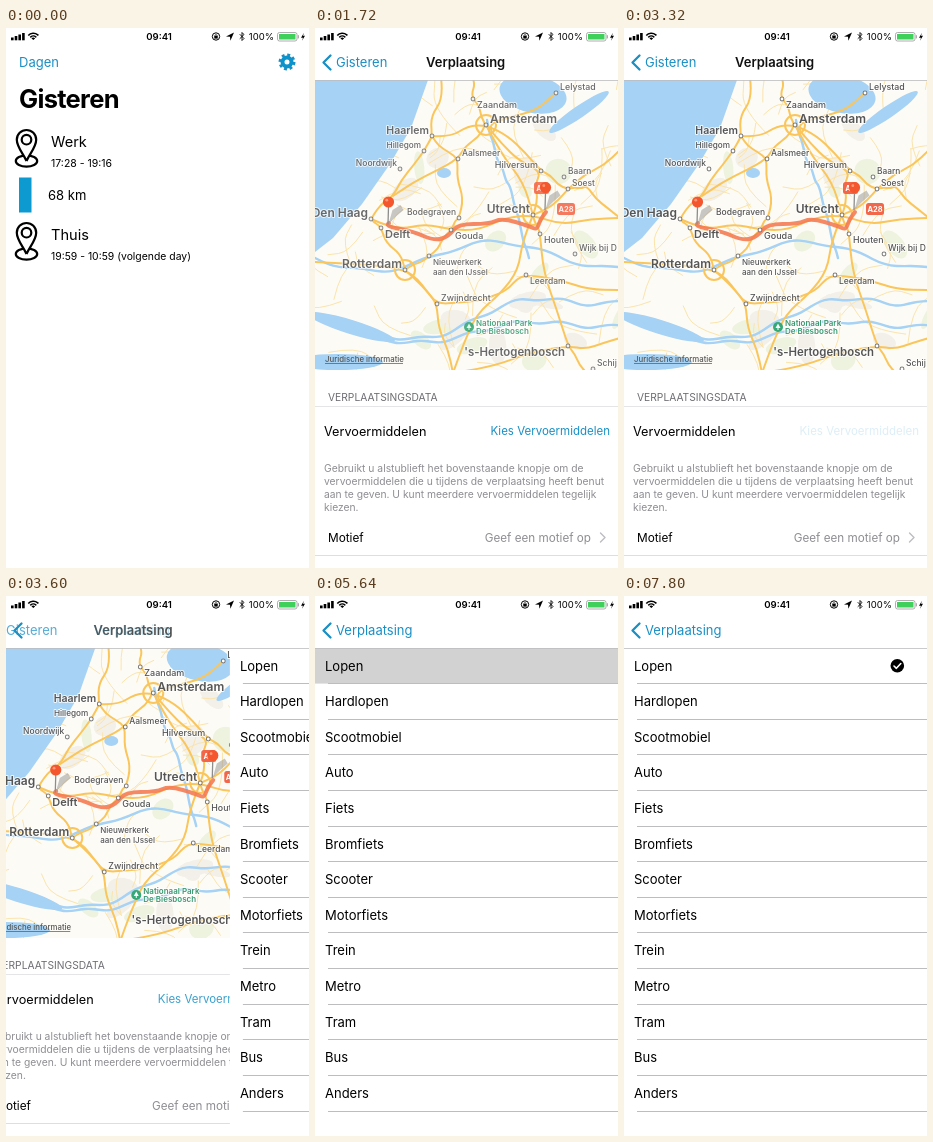
These frames come from a looping animation (303x540 px, 8000 ms). An HTML page with a canvas:

```html
<!DOCTYPE html>
<html lang="nl">
<head>
<meta charset="utf-8">
<title>Verplaatsing</title>
<style>
  html, body { margin: 0; width: 100%; height: 100%; overflow: hidden; background: #fff; }
  canvas { display: block; width: 303px; height: 540px; }
</style>
</head>
<body>
<canvas></canvas>
<script>
const W = 303, H = 540, LOOP = 8000;
const BLUE = '#1a8fc4', LINE = '#bdbdc0', GREY = '#8e8e93', FONT = 'Inter, sans-serif';
const canvas = document.querySelector('canvas');
const dpr = window.devicePixelRatio || 1;
canvas.width = W * dpr;
canvas.height = H * dpr;
const c = canvas.getContext('2d');
c.scale(dpr, dpr);

const clamp = v => Math.max(0, Math.min(1, v));
const lerp = (a, b, k) => a + (b - a) * k;
const ramp = (t, from, to) => clamp((t - from) / (to - from));
const ease = k => k * k * (3 - 2 * k);

function group(fn, x = 0, y = 0, alpha = 1) {
  if (alpha <= 0) return;
  c.save();
  c.translate(x, y);
  c.globalAlpha *= alpha;
  fn();
  c.restore();
}

function rect(x, y, w, h, color) {
  c.fillStyle = color;
  c.fillRect(x, y, w, h);
}

// y is the middle of the capitals
function text(str, x, y, size, color = '#000', { weight = 400, align = 'left', alpha = 1, spacing = 0, halo } = {}) {
  group(() => {
    c.font = `${weight} ${size}px ${FONT}`;
    c.textAlign = align;
    c.letterSpacing = spacing + 'px';
    if (halo) {
      c.lineJoin = 'round';
      c.lineWidth = 2;
      c.strokeStyle = halo;
      c.strokeText(str, x, y + size * 0.36);
    }
    c.fillStyle = color;
    c.fillText(str, x, y + size * 0.36);
  }, 0, 0, alpha);
}

function trace(pts, smooth) {
  const n = pts.length;
  c.beginPath();
  c.moveTo(pts[0], pts[1]);
  for (let i = 2; i < n; i += 2) {
    if (smooth && i < n - 2)
      c.quadraticCurveTo(pts[i], pts[i + 1], (pts[i] + pts[i + 2]) / 2, (pts[i + 1] + pts[i + 3]) / 2);
    else c.lineTo(pts[i], pts[i + 1]);
  }
}

function stroke(pts, color, width, smooth = false) {
  trace(pts, smooth);
  c.strokeStyle = color;
  c.lineWidth = width;
  c.lineCap = c.lineJoin = 'round';
  c.stroke();
}

function fill(pts, color) {
  trace(pts);
  c.fillStyle = color;
  c.fill();
}

function oval(x, y, rx, ry, color, angle = 0) {
  c.beginPath();
  c.ellipse(x, y, rx, ry, angle, 0, 7);
  c.fillStyle = color;
  c.fill();
}
const disc = (x, y, r, color) => oval(x, y, r, r, color);

function ring(x, y, r, color, width, from = 0, to = 2 * Math.PI) {
  c.beginPath();
  c.arc(x, y, r, from, to);
  c.strokeStyle = color;
  c.lineWidth = width;
  c.lineCap = 'butt';
  c.stroke();
}

// arrow head with its tip at x, y; dir -1 points left
function chevron(x, y, size, dir, color, width) {
  stroke([x - dir * size, y - size, x, y, x - dir * size, y + size], color, width);
}

function statusBar() {
  for (let i = 0; i < 4; i++) rect(5 + i * 3.7, 9.5 - i * 1.5, 2.6, 2.8 + i * 1.5, '#000');
  for (const r of [1.2, 4, 6.7]) ring(27.3, 12, r, '#000', r < 2 ? 2.4 : 1.6, -Math.PI * 0.77, -Math.PI * 0.23);
  text('09:41', 153, 8.5, 9.6, '#000', { weight: 600, align: 'center' });
  ring(210, 8.5, 3.7, '#000', 1);
  rect(208.3, 8, 3.4, 2.6, '#000');
  ring(210, 7.8, 1.1, '#000', 0.8);
  fill([228, 4.5, 220, 8.5, 224, 8.8, 224.4, 12.8], '#000');
  group(() => stroke([-2, -2, 2, 2, 0, 4, 0, -4, 2, -2, -2, 2], '#000', 0.9), 236, 8.5);
  text('100%', 268, 8.5, 9.5, '#000', { align: 'right' });
  c.beginPath();
  c.roundRect(271.5, 4.5, 19.5, 8.5, 2);
  c.strokeStyle = '#9a9a9a';
  c.lineWidth = 0.8;
  c.stroke();
  rect(273, 6, 16.5, 5.5, '#3fd05c');
  rect(291.8, 7.2, 1, 3.2, '#9a9a9a');
  group(() => fill([1, -4, -2, 1, 0, 1, -1, 4, 2, -1, 0, -1], '#000'), 297, 8.7);
}

function gear() {
  c.setLineDash([2.85, 2.65]);
  ring(281, 34, 7, BLUE, 3);
  c.setLineDash([]);
  ring(281, 34, 4.5, '#0d93cb', 4);
}

function placeIcon(y) {
  group(() => {
    c.beginPath();
    c.ellipse(0, 32, 10.7, 5.6, 0, 0, 7);
    c.strokeStyle = '#000';
    c.lineWidth = 2.2;
    c.stroke();
    c.beginPath();
    c.moveTo(0, 32);
    c.bezierCurveTo(-3, 25, -9.7, 18, -9.7, 10.7);
    c.arc(0, 10.7, 9.7, Math.PI, 0);
    c.bezierCurveTo(9.7, 18, 3, 25, 0, 32);
    c.fillStyle = '#fff';
    c.fill();
    c.stroke();
    ring(0, 10.7, 4.8, '#000', 2.2);
  }, 20.5, y);
}

function dayPage(pressed) {
  if (pressed) rect(0, 149, W, 36.5, '#cacaca');
  placeIcon(101);
  text('Werk', 45, 114, 14.6);
  text('17:28 - 19:16', 45, 135, 10.5);
  rect(13, 149.5, 12.5, 35, '#0d9ad1');
  text('68 km', 42, 167, 13);
  placeIcon(194);
  text('Thuis', 45, 207, 14.6);
  text('19:59 - 10:59 (volgende day)', 45, 228, 10.4);
}

function emptyMap() {
  rect(0, 52, W, 290, '#fdfcf9');
  for (let i = 0; i < 36; i++) {
    const major = i % 4 === 0, strong = i % 8 === 0;
    const color = strong ? '#c4c4c2' : major ? '#d6d6d2' : '#f3efe2';
    const width = strong ? 1.8 : major ? 1.3 : 0.7;
    const x = -5 + i * 8.9, y = 60 + i * 8.9;
    stroke([x, 52, x, 342], color, width);
    if (y < 342) stroke([0, y, W, y], color, width);
  }
}

// name: dot x, dot y, font size, label side (l or r) and height (u or d)
const PLACES = {
  'Zaandam': [158, 71, 9, 'rd'],
  'Haarlem': [117, 108, 10.5, 'lu'],
  'Amsterdam': [171, 97, 12, 'ru'],
  'Lelystad': [241, 65, 8.8, 'ru'],
  'Hillegom': [109, 123, 8.2, 'lu'],
  'Noordwijk': [85, 141, 8.5, 'lu'],
  'Aalsmeer': [143, 131, 8.5, 'ru'],
  'Hilversum': [226, 143, 9, 'lu'],
  'Baarn': [249, 149, 8.4, 'ru'],
  'Soest': [253, 161, 8.4, 'ru'],
  'Utrecht': [218, 187, 12, 'lu'],
  'Den Haag': [56, 191, 12, 'lu'],
  'Bodegraven': [144, 190, 8.5, 'lu'],
  'Delft': [66, 200, 11, 'rd'],
  'Gouda': [136, 202, 9, 'rd'],
  'Houten': [225, 206, 8.8, 'rd'],
  'Rotterdam': [90, 242, 12, 'lu'],
  'Nieuwerkerk': [114, 228, 8, 'rd'],
  'Leerdam': [211, 247, 8.5, 'rd'],
  'Zwijndrecht': [122, 276, 8.8, 'ru'],
  "'s-Hertogenbosch": [253, 318, 11.4, 'ld'],
  'Wijk bij D': [260, 226, 8.5, 'ru'],
  'Schij': [278, 341, 8.5, 'ru']
};
const JUNCTIONS = {
  leiden: [78, 168], breda: [138, 345], gorinchem: [186, 265], north: [126, 50],
  amersfoort: [272, 158], east: [305, 190], northeast: [305, 122], south: [272, 345],
  west: [-2, 234], northwest: [158, 50], southeast: [305, 310], betuwe: [305, 262]
};
const ROADS = [
  'north Haarlem Hillegom leiden Den_Haag Delft Rotterdam',
  'northwest Zaandam Amsterdam Aalsmeer leiden',
  "Amsterdam Utrecht Houten 's-Hertogenbosch south",
  'Den_Haag Gouda Utrecht east',
  'Rotterdam Nieuwerkerk Gouda Bodegraven Aalsmeer Haarlem',
  'Haarlem Amsterdam Hilversum Soest amersfoort east',
  'west Rotterdam Zwijndrecht gorinchem Leerdam betuwe',
  'Utrecht gorinchem breda',
  'Rotterdam Zwijndrecht breda',
  'Utrecht Hilversum Amsterdam Lelystad',
  'Utrecht Soest northeast',
  "breda 's-Hertogenbosch southeast"
].map(road => road.split(' ').map(key => PLACES[key.replace('_', ' ')] || JUNCTIONS[key]));

const SEA = [0, 52, 113, 52, 96, 100, 75, 136, 47, 176, 18, 210, 0, 224];
const LAKES = [[218, 66, 34, 19, 0.2], [264, 84, 36, 6, -0.6], [129, 145, 7, 5, 0], [36, 299, 46, 7, 0.3], [22, 334, 46, 8, 0]];
const RIVERS = [[0, 230, 303, 226, 14], [70, 308, 303, 264, 10], [70, 312, 303, 292, 6], [172, 92, 214, 226, 5]];
const ROUTE = [74, 195, 69, 198, 97, 203, 120, 213, 134, 208, 143, 196, 174, 196, 187, 190, 214, 198, 222, 202, 225, 192, 231, 184];

function seeded(seed) {
  return () => (seed = (seed * 16807) % 2147483647) / 2147483647;
}

// line through the stops, bent a little between each two
function roadPath(stops, random) {
  const pts = [stops[0][0], stops[0][1]];
  for (let i = 1; i < stops.length; i++) {
    const [ax, ay] = stops[i - 1], [bx, by] = stops[i];
    for (const k of [0.33, 0.67]) {
      const bend = (random() - 0.5) * 0.22;
      pts.push(lerp(ax, bx, k) - (by - ay) * bend, lerp(ay, by, k) + (bx - ax) * bend);
    }
    pts.push(bx, by);
  }
  return pts;
}

function river([x0, y0, x1, y1, swing]) {
  const pts = [];
  for (let k = 0; k <= 1.001; k += 0.04)
    pts.push(lerp(x0, x1, k), lerp(y0, y1, k) + swing * Math.sin(k * 8) + 2 * Math.sin(k * 31));
  return pts;
}

function fullMap() {
  const random = seeded(71);
  rect(0, 52, W, 290, '#fdfbf5');
  for (let i = 0; i < 22; i++)
    oval(90 + random() * 220, 70 + random() * 270, 6 + random() * 14, 4 + random() * 9, i % 2 ? '#eef3df' : '#f3f0ea', random() * 3);
  for (let i = 0; i < 90; i++) {
    const x = random() * W, y = 52 + random() * 290, a = random() * 6.3, len = 14 + random() * 26;
    stroke([x, y, x + len * Math.cos(a), y + len * Math.sin(a),
      x + 1.7 * len * Math.cos(a + 0.4), y + 1.7 * len * Math.sin(a + 0.4)], '#fbe4ac', 1, true);
  }
  const water = '#a5d2f5', road = '#fac65c';
  fill(SEA, water);
  for (const [x, y, rx, ry, angle] of LAKES) oval(x, y, rx, ry, water, angle);
  for (const r of RIVERS) stroke(river(r), water, 2.4, true);
  for (const stops of ROADS) stroke(roadPath(stops, random), road, 2, true);
  for (const city of ['Amsterdam', 'Rotterdam', 'Utrecht']) ring(PLACES[city][0], PLACES[city][1], 10, road, 2);
}

function mapLabels() {
  for (const [name, [x, y, size, side]] of Object.entries(PLACES)) {
    const left = side[0] === 'l', dy = side[1] === 'u' ? -6 : 6;
    disc(x, y, 2.4, '#777');
    disc(x, y, 1.4, '#fff');
    text(name, x + (left ? -3 : 4), y + dy, size, '#555',
      { weight: size > 10 ? 600 : 500, align: left ? 'right' : 'left', halo: '#fffc' });
  }
  text('aan den IJssel', 118, 244, 8, '#555', { weight: 500, halo: '#fffc' });
  disc(154, 299, 5, '#35a877');
  fill([154, 295.5, 151.5, 300, 156.5, 300], '#fff');
  rect(153.5, 300, 1, 2, '#fff');
  ['Nationaal Park', 'De Biesbosch'].forEach((s, i) =>
    text(s, 161, 295 + i * 8, 8, '#3a9a72', { weight: 600, halo: '#fffc' }));
}

function roadSign(label, x, y, w) {
  c.beginPath();
  c.roundRect(x, y, w, 12, 2.5);
  c.fillStyle = '#f2674a';
  c.fill();
  text(label, x + w / 2, y + 6, 7.5, '#fff', { weight: 700, align: 'center' });
}

function mapPin(x, y) {
  group(() => {
    fill([0, 22, 4, 8, 12, 3, 15, 8, 8, 14], '#9998');
    stroke([0, 5, -0.5, 22], '#8d8d8d', 1.3);
    disc(0, 0, 5.6, '#f4562d');
    disc(-1.7, -1.8, 1.4, '#ff9a78');
  }, x, y);
}

function mapView(loaded, labels) {
  c.save();
  c.beginPath();
  c.rect(0, 52, W, 290);
  c.clip();
  emptyMap();
  group(fullMap, 0, 0, loaded);
  stroke(ROUTE, loaded > 0.5 ? '#f5794fdd' : '#fa8a7add', 4, true);
  group(() => {
    mapLabels();
    roadSign('A2', 219, 154, 15);
    roadSign('A28', 242, 175, 18);
  }, 0, 0, labels);
  mapPin(73.5, 174);
  mapPin(230.5, 159.5);
  text('Juridische informatie', 10, 331, 7.8, '#555', { weight: 500 });
  rect(10, 335, 78, 0.7, '#555');
  c.restore();
}

function tripPage(t) {
  mapView(ramp(t, 1460, 1660), ramp(t, 1580, 1740));
  text('VERPLAATSINGSDATA', 13, 369, 10.25, '#6d6d72');
  rect(0, 378, W, 0.7, '#dadade');
  text('Vervoermiddelen', 9, 403, 12.7);
  const dim = ramp(t, 3230, 3310) * (1 - ramp(t, 3420, 3640));
  text('Kies Vervoermiddelen', 295, 403, 11.5, BLUE, { align: 'right', alpha: 1 - 0.85 * dim });
  ['Gebruikt u alstublieft het bovenstaande knopje om de',
    'vervoermiddelen die u tijdens de verplaatsing heeft benut',
    'aan te geven. U kunt meerdere vervoermiddelen tegelijk',
    'kiezen.'].forEach((s, i) => text(s, 9, 440.5 + i * 12.8, 10.3, GREY));
  text('Motief', 13, 509.5, 11.8);
  text('Geef een motief op', 276, 509.5, 11.7, GREY, { align: 'right' });
  chevron(290, 509.5, 4.5, 1, '#bcbcc2', 1.4);
  rect(0, 527, W, 0.7, '#d0d0d4');
}

const MODES = ['Lopen', 'Hardlopen', 'Scootmobiel', 'Auto', 'Fiets', 'Bromfiets', 'Scooter',
  'Motorfiets', 'Trein', 'Metro', 'Tram', 'Bus', 'Anders'];

function modePage(t) {
  if (t >= 5600) group(() => rect(0, 52, W, 35.6, '#d2d2d2'), 0, 0, 1 - ramp(t, 5840, 6200));
  MODES.forEach((name, i) => {
    text(name, 10, 70 + i * 35.6, 13);
    rect(13, Math.round(87 + i * 35.63), W, 1, LINE);
  });
  if (t >= 5840) {
    disc(273.3, 69.7, 6.8, '#000');
    stroke([270, 70, 272.4, 72.3, 276.8, 67.5], '#fff', 1.6);
  }
}

function navBar(p1, p2) {
  const bottom = 52 + 46 * (1 - p1);
  rect(0, 0, W, bottom, '#fff');
  group(() => rect(0, bottom, W, 0.8, LINE), 0, 0, p1);

  text('Dagen', 13 - 6 * p1, 34.5, 13, BLUE, { alpha: 1 - p1 });
  group(gear, 0, 0, 1 - p1);

  const x = lerp(13, 21, p1) - 80 * p2, y = lerp(71, 34.5, p1), size = lerp(25.5, 13, p1);
  text('Gisteren', x, y, size, '#000', { weight: 700, spacing: -0.7, alpha: 1 - 2 * p1 });
  text('Gisteren', x, y, size, BLUE, { alpha: clamp(2 * p1 - 0.5) * (1 - p2) });
  group(() => chevron(8.5, 34.5, 7, -1, BLUE, 2.3), 0, 0, ramp(p1, 0.85, 1));

  const titleX = lerp(111, 21, p2) + 227 * (1 - p1);
  text('Verplaatsing', titleX, 34.5, 13, '#111', { weight: 600, alpha: p1 * (1 - p2) });
  text('Verplaatsing', titleX, 34.5, 13, BLUE, { alpha: p2 });
}

function page(x, drawPage) {
  if (x >= W) return;
  group(() => {
    rect(0, 0, W, H, '#fff');
    drawPage();
  }, x);
}

function draw(t) {
  const p1 = ease(ramp(t, 800, 1550)), p2 = ease(ramp(t, 3360, 4080));
  const parallax = -0.3 * W;
  rect(0, 0, W, H, '#fff');
  if (p1 < 1) page(parallax * p1, () => dayPage(t >= 120));
  if (p2 < 1) page(W * (1 - p1) + parallax * p2, () => tripPage(t));
  page(W * (1 - p2), () => modePage(t));
  navBar(p1, p2);
  statusBar();
}

const start = performance.now();
function tick() {
  draw((performance.now() - start) % LOOP);
  requestAnimationFrame(tick);
}
tick();
</script>
</body>
</html>
```
